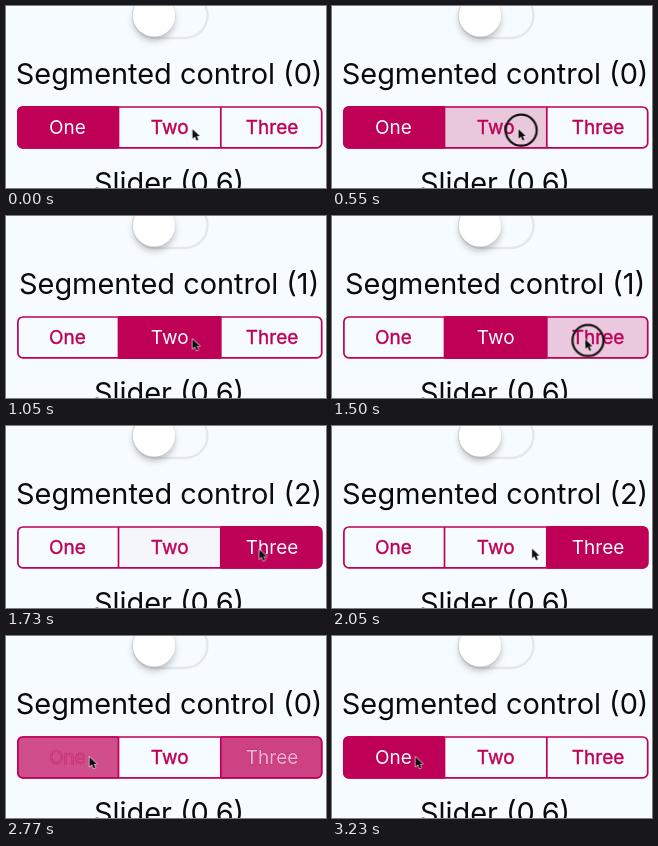
Animation, 320 px wide and 182 px high, one loop 3.28 s. Source, as an HTML page:

```html
<!DOCTYPE html>
<html lang="en">
<head>
<meta charset="utf-8">
<title>Segmented control</title>
<style>
  :root { --pink: #be0057; --paper: #f6fbff; --soft: cubic-bezier(.4, .3, .6, .9); }
  html, body { margin: 0; width: 100%; height: 100%; overflow: hidden; background: var(--paper); }
  svg { display: block; width: 320px; height: 182px; }
  text { font-family: Inter, Roboto, sans-serif; text-anchor: middle; }
  .head { font-size: 28.9px; fill: #080a0c; }
  .label { font-size: 19px; fill: var(--pink); stroke: var(--pink); stroke-width: .4; paint-order: stroke; }
  .fill { fill: var(--pink); }
  .line { fill: none; stroke: var(--pink); stroke-width: 1.7; }
  .fill, .label, .cursor { animation: 3.28s ease-in-out infinite; }
  .count, .ring { animation: 3.28s step-end infinite; }

  .fill.one { animation-name: fill-one; }
  .fill.two { animation-name: fill-two; }
  .fill.three { animation-name: fill-three; }
  .label.one { animation-name: label-one; }
  .label.two { animation-name: label-two; }
  .label.three { animation-name: label-three; }
  .count.n0 { animation-name: count-0; }
  .count.n1 { animation-name: count-1; }
  .count.n2 { animation-name: count-2; }
  .ring { animation-name: ring; }
  .cursor { animation-name: move; }

  /* pressed at .2, then cross-fade to selected */
  @keyframes fill-one {
    0%, 19.82% { opacity: 1; }
    25.91%, 78.66% { opacity: 0; }
    78.67% { opacity: .2; }
    82.32% { opacity: .2; animation-timing-function: var(--soft); }
    88.41%, 100% { opacity: 1; }
  }
  @keyframes fill-two {
    0%, 16.16% { opacity: 0; }
    16.17% { opacity: .2; }
    19.82% { opacity: .2; animation-timing-function: var(--soft); }
    25.91%, 47.26% { opacity: 1; }
    53.35%, 100% { opacity: 0; }
  }
  @keyframes fill-three {
    0%, 43.6% { opacity: 0; }
    43.61% { opacity: .2; }
    47.26% { opacity: .2; animation-timing-function: var(--soft); }
    53.35%, 82.32% { opacity: 1; }
    88.41%, 100% { opacity: 0; }
  }
  @keyframes label-one {
    0%, 19.82%, 88.41%, 100% { fill: var(--paper); }
    25.91%, 82.32% { fill: var(--pink); }
  }
  @keyframes label-two {
    0%, 19.82%, 53.35%, 100% { fill: var(--pink); }
    25.91%, 47.26% { fill: var(--paper); }
  }
  @keyframes label-three {
    0%, 47.26%, 88.41%, 100% { fill: var(--pink); }
    53.35%, 82.32% { fill: var(--paper); }
  }
  @keyframes count-0 {
    0%, 83.23%, 100% { opacity: 1; }
    20.73% { opacity: 0; }
  }
  @keyframes count-1 {
    0%, 47.87%, 100% { opacity: 0; }
    20.73% { opacity: 1; }
  }
  @keyframes count-2 {
    0%, 83.23%, 100% { opacity: 0; }
    47.87% { opacity: 1; }
  }
  @keyframes ring {
    0%, 19.82%, 47.26%, 82.32%, 100% { opacity: 0; }
    16.16%, 43.6%, 78.66% { opacity: 1; }
  }
  @keyframes move {
    0%, 34.45% { transform: translate(186.5px, 123px); }
    42.68%, 57.32% { transform: translate(253.3px, 123.3px); }
    70.73%, 100% { transform: translate(83.5px, 120.8px); }
  }
</style>
</head>
<body>
<svg viewBox="0 0 320 182">
  <defs>
    <clipPath id="bar"><rect x="11" y="100.1" width="305.6" height="42.6" rx="6"/></clipPath>
    <filter id="blur" x="-50%" y="-50%" width="200%" height="200%"><feGaussianBlur stdDeviation="3.5"/></filter>
  </defs>

  <!-- switch -->
  <rect x="127" y="-13" width="74.5" height="45" rx="22.5" fill="none" stroke="#e4e8eb" stroke-width="2.4"/>
  <circle cx="148" cy="14" r="20.5" fill="#000" opacity=".25" filter="url(#blur)"/>
  <circle cx="148" cy="9.5" r="21.3" fill="#fff" stroke="#000" stroke-opacity=".07" stroke-width=".8"/>

  <g class="head">
    <text class="count n0" x="163.1" y="78">Segmented control (0)</text>
    <text class="count n1" x="163.1" y="78" opacity="0">Segmented control (1)</text>
    <text class="count n2" x="163.1" y="78" opacity="0">Segmented control (2)</text>
    <text x="163.1" y="187">Slider (0.6)</text>
  </g>

  <g clip-path="url(#bar)">
    <rect class="fill one" x="11" y="100" width="101.5" height="43"/>
    <rect class="fill two" x="112.5" y="100" width="102.3" height="43"/>
    <rect class="fill three" x="214.8" y="100" width="102" height="43"/>
  </g>
  <rect class="line" x="11.9" y="101" width="303.8" height="40.9" rx="5"/>
  <path class="line" d="M112.5 101V142M214.8 101V142"/>
  <text class="label one" x="61.5" y="128.3">One</text>
  <text class="label two" x="163.7" y="128.3">Two</text>
  <text class="label three" x="266.1" y="128.3">Three</text>

  <g class="cursor">
    <circle class="ring" cx="2.7" cy="1.2" r="15.5" fill="none" stroke="#111" stroke-width="2.2"/>
    <path transform="scale(.88)" d="M0 0V11.2L2.7 8.8L4.6 13.2L6.7 12.3L4.9 8.1H8.3Z" fill="#0c0c0e" stroke="#fff" stroke-opacity=".85" stroke-width="1.4" paint-order="stroke" stroke-linejoin="round"/>
  </g>
</svg>
</body>
</html>
```
